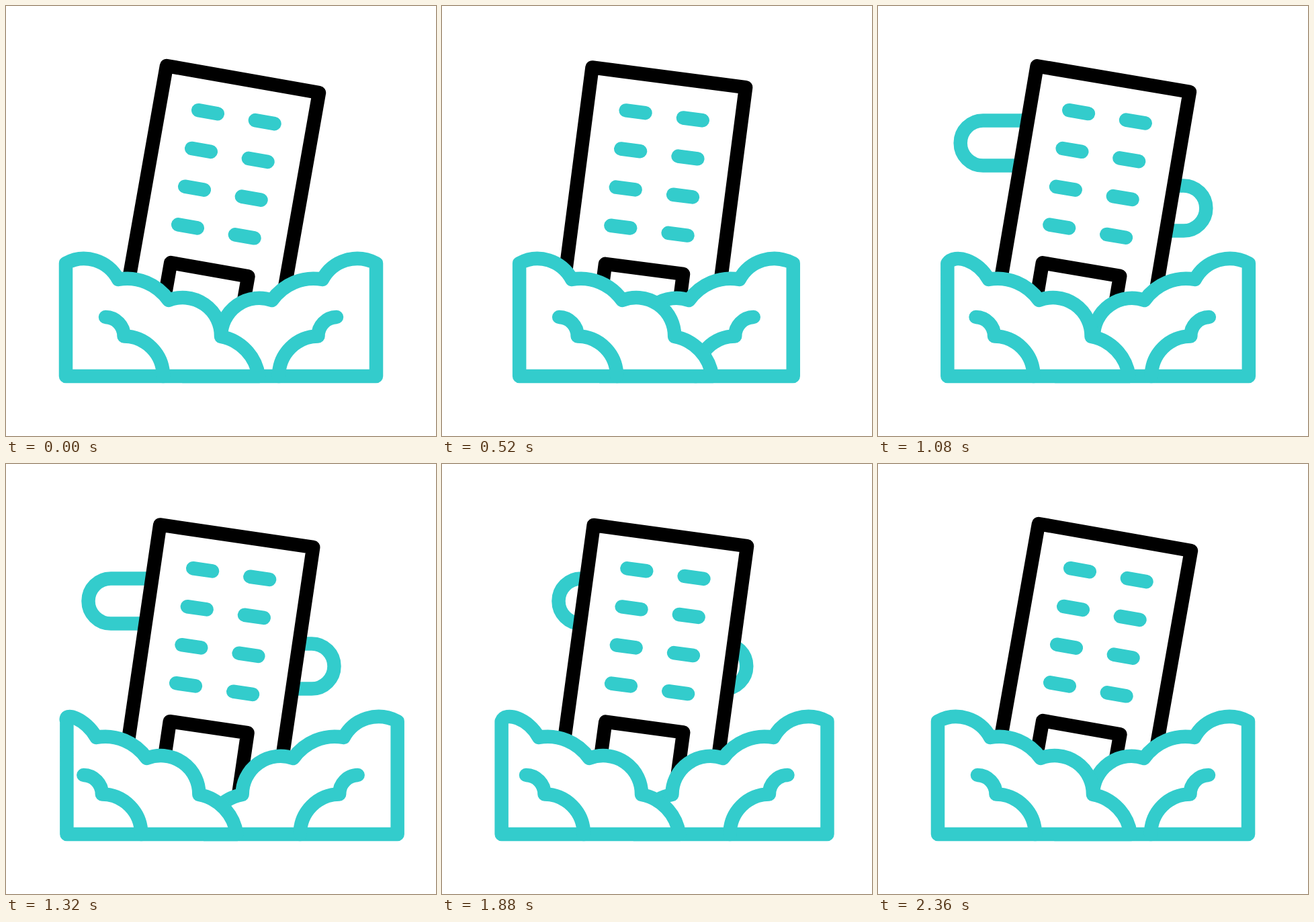
An HTML page for the animation above (2400 ms loop, 640 by 640 pixels).

```html
<!DOCTYPE html>
<html lang="en">
<head>
<meta charset="utf-8">
<title>Collapsing building</title>
<style>
  html, body { margin: 0; width: 100%; height: 100%; overflow: hidden; background: #fff; }
  svg { display: block; width: 100%; height: 100%; }
</style>
</head>
<body>
<svg viewBox="0 0 640 640" fill="#fff" stroke="#3cc" stroke-width="20.5" stroke-linecap="round" stroke-linejoin="round">
  <path id="trailLeft" d="M256 170.5H156a33.5 33.5 0 0 0 0 67H256"/>
  <path id="trailRight" d="M355 267.5H455a33.5 33.5 0 0 1 0 67H355"/>
  <g id="building">
    <g transform="translate(239 89) rotate(10)">
      <path stroke="#000" d="M0 400V0H230.5V400M57 400V287.5H174V400"/>
      <path id="windows"/>
    </g>
  </g>
  <g id="cloudRight" transform="matrix(-1 0 0 1 640 0)"><path/><path fill="none"/></g>
  <g id="cloudLeft"><path/><path fill="none"/></g>
</svg>
<script>
const LOOP = 2400, STEP = 40;
const byId = id => document.getElementById(id);

// Timing curve with control points (x1, 0) and (x2, 1).
function ease(x, x1, x2) {
  let lo = 0, hi = 1, s;
  for (let i = 0; i < 24; i++) {
    s = (lo + hi) / 2;
    const at = 3 * s * (1 - s) ** 2 * x1 + 3 * s * s * (1 - s) * x2 + s ** 3;
    if (at < x) lo = s; else hi = s;
  }
  return s * s * (3 - 2 * s);
}

// Keys are [time, value, x1, x2]; the curve leads into its key.
function track(t, keys) {
  const i = keys.findIndex(key => t < key[0]);
  if (i < 0) return keys[keys.length - 1][1];
  if (i === 0) return keys[0][1];
  const [t0, v0] = keys[i - 1];
  const [t1, v1, x1 = 2 / 3, x2 = 1 / 3] = keys[i];
  return v0 + (v1 - v0) * ease((t - t0) / (t1 - t0), x1, x2);
}

const cloudKeys = (near, far) =>
  [[40, 0], [627, near], [1559, far], [2400, 0, 0.605, 0.165]];
const LEFT = cloudKeys(27, -37.3);
const LEFT_EDGE = cloudKeys(27, -0.6);
const RIGHT = cloudKeys(29.2, -36.4);
const TRAIL = [[280, 1], [1120, 0], [1480, 0], [2300, 1]];
const soft = (time, value) => [time, value, 1 / 3, 2 / 3];
const TILT = [soft(30, 0), soft(535, -2.6), soft(870, 0), soft(900, 0), soft(1680, -2.95), soft(2300, 0)];

// The side edge moves on its own; inset shifts the two outer notches.
function drawCloud(id, shift, edge, inset) {
  const [body, swirl] = byId(id).children;
  const x = v => v + shift;
  const notch = v => x(v + inset);
  body.setAttribute("d", `M${89 + edge} 551V383
    C${notch(117.2)} 367.5 ${notch(151.7)} 378.7 ${notch(167)} 407
    A75 75 0 0 1 ${notch(242)} 438
    A57 57 0 0 1 ${x(320)} 492
    A69.5 69.5 0 0 1 ${x(376)} 551Z`);
  swirl.setAttribute("d", `M${x(148)} 463A28 28 0 0 1 ${x(175.5)} 491.5
    A58.5 59.5 0 0 1 ${x(234)} 551`);
}

function draw(now) {
  const t = Math.floor(now % LOOP / STEP) * STEP;
  const hidden = track(t, TRAIL);
  const right = track(t, RIGHT);
  byId("trailLeft").setAttribute("transform", `translate(${110 * hidden})`);
  byId("trailRight").setAttribute("transform", `translate(${-76 * hidden})`);
  byId("building").setAttribute("transform", `rotate(${track(t, TILT)} 284 432)`);
  drawCloud("cloudRight", right, right, 2);
  drawCloud("cloudLeft", track(t, LEFT), track(t, LEFT_EDGE), 0);
}

byId("windows").setAttribute("d", [0, 1, 2, 3]
  .map(row => `M58 ${57 + 57.6 * row}h29m57 0h29`).join(""));

let start;
function tick(now) {
  start ??= now;
  draw(now - start);
  requestAnimationFrame(tick);
}
draw(0);
requestAnimationFrame(tick);
</script>
</body>
</html>
```
